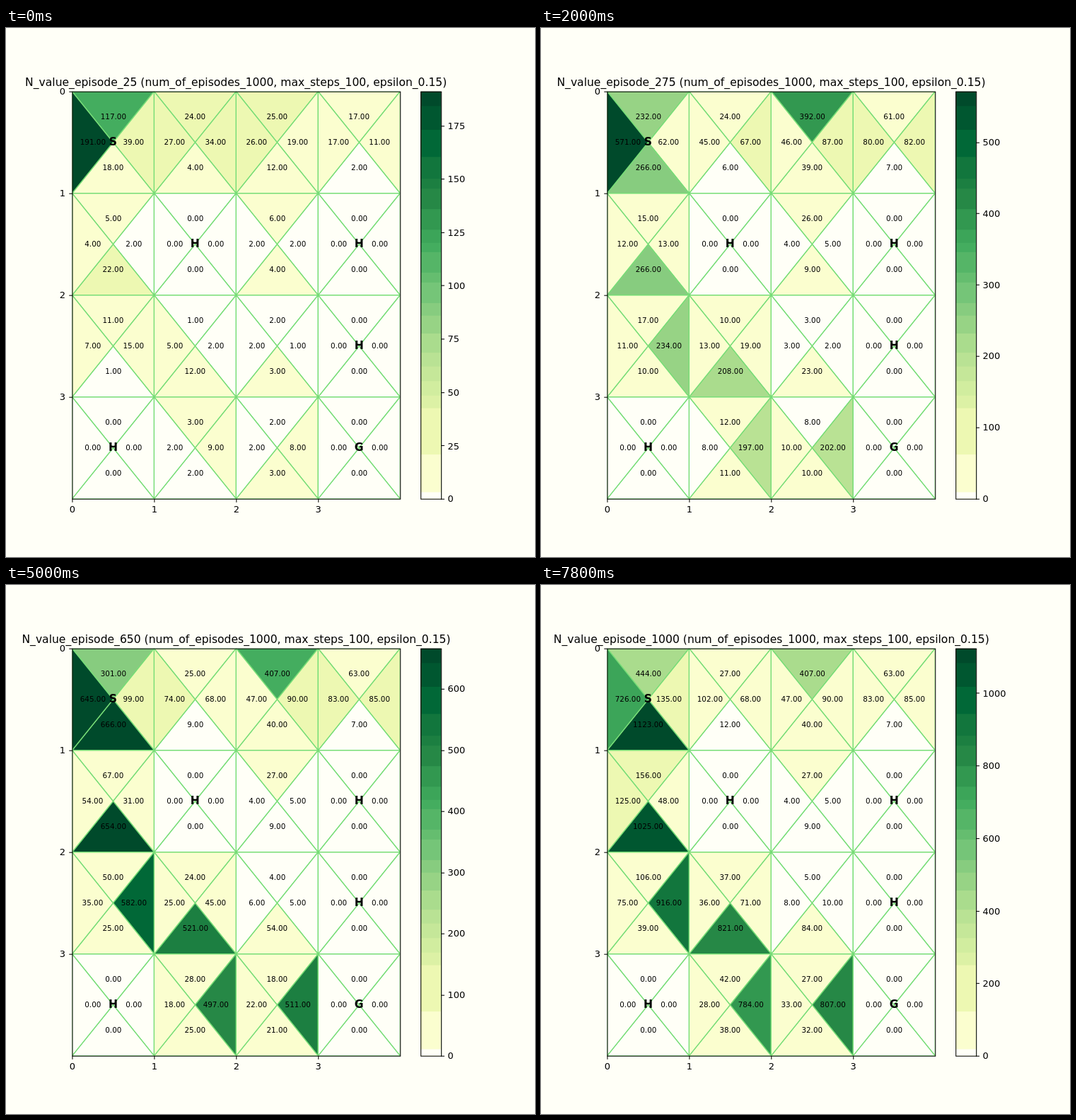
These frames come from a looping animation (748 by 748 pixels, 8 s). An HTML page with a canvas:

```html
<!DOCTYPE html>
<html lang="en">
<head>
<meta charset="utf-8">
<title>Visit counts per state and action</title>
<style>
  html, body { margin: 0; width: 100%; height: 100%; overflow: hidden; background: #fffff7; }
  canvas { display: block; }
</style>
</head>
<body>
<canvas id="stage" width="748" height="748"></canvas>
<script>
const ctx = document.getElementById('stage').getContext('2d');

// The figure is laid out on 800 units at 100 dpi, then scaled to the stage
const SIZE = 800, SCALE = 748 / SIZE, PT = 100 / 72;
const STEP_MS = 200, STEPS = 40, EPISODES_PER_STEP = 25;
const PAPER = '#fffff7', GRID = '#77dd77', INK = '#000';

const plot = { x: 100, y: 96, w: 496, h: 616 };
const bar = { x: 627, w: 30.8 };
const cellW = plot.w / 4, cellH = plot.h / 4;
const bottom = plot.y + plot.h;

// Yellow to green ramp, cut into flat bands that end at these of 256 levels
const RAMP = [0xffffe5, 0xf7fcb9, 0xd9f0a3, 0xaddd8e, 0x78c679, 0x41ab5d, 0x238443, 0x006837, 0x004529];
const ENDS = [4, 28, 57, 65, 74, 83, 92, 104, 115, 123, 136, 142, 155, 161, 169, 182, 195, 201, 215, 232, 247, 256];

function ramp(level) {
  const at = level / 256 * (RAMP.length - 1), i = Math.floor(at);
  const mix = shift => {
    const a = RAMP[i] >> shift & 255, b = RAMP[i + 1] >> shift & 255;
    return Math.round(a + (b - a) * (at - i));
  };
  return `rgb(${mix(16)}, ${mix(8)}, ${mix(0)})`;
}

const bands = ENDS.map((end, i) => ({ end, fill: i ? ramp((ENDS[i - 1] + end) / 2) : PAPER }));
const colour = share => bands.find(b => share * 256 < b.end || b.end === 256).fill;

// How a count grows from the first episode shown (p = 0) to the last (p = 1)
const grow = ease => (from, to) => p => from + (to - from) * ease(p);
const early = grow(p => 1 - (1 - p) ** 11);
const steady = grow(p => p ** 1.04);
const late = grow(p => p * p);

const KEY_TIMES = [25, 200, 350, 475, 650, 875, 1000].map(e => (e - 25) / 975);
const keyed = (...values) => p => {
  const i = Math.max(1, KEY_TIMES.findIndex(t => t >= p));
  const k = (p - KEY_TIMES[i - 1]) / (KEY_TIMES[i] - KEY_TIMES[i - 1]);
  return values[i - 1] + (values[i] - values[i - 1]) * k;
};

// Start, hole, goal or plain cell, row by row
const MAP = 'S....H.H...HH..G';
const never = Array(4).fill(() => 0);

// Open cells: growth of up, right, down, left
const cells = {
  0: [keyed(117, 229, 235, 291, 301, 403, 444), steady(39, 135),
      keyed(18, 185, 346, 478, 666, 926, 1123), keyed(191, 568, 573, 639, 645, 718, 726)],
  1: [late(24, 27), early(34, 68), steady(4, 12), steady(27, 102)],
  2: [early(25, 407), early(19, 90), early(12, 40), early(26, 47)],
  3: [early(17, 63), early(11, 85), early(2, 7), early(17, 83)],
  4: [late(5, 156), steady(2, 48), steady(22, 1025), late(4, 125)],
  6: [early(6, 27), early(2, 5), early(4, 9), early(2, 4)],
  8: [late(11, 106), steady(15, 916), steady(1, 39), late(7, 75)],
  9: [steady(1, 37), steady(2, 71), steady(12, 821), steady(5, 36)],
  10: [steady(2, 5), late(1, 10), steady(3, 84), steady(2, 8)],
  13: [steady(3, 42), steady(9, 784), steady(2, 38), steady(2, 28)],
  14: [steady(2, 27), steady(8, 807), steady(3, 32), steady(2, 33)]
};

function tickStep(max) {
  const raw = max / 9, power = 10 ** Math.floor(Math.log10(raw));
  return power * [1, 2, 2.5, 5, 10].find(s => s * power >= raw);
}

const snapPx = v => Math.floor(v + 0.5) + 0.5;

// align: 0 left, 0.5 centre, 1 right
function write(text, x, baseline, points, align, weight = 'normal') {
  ctx.font = `${weight} ${points * PT}px "DejaVu Sans", sans-serif`;
  ctx.fillStyle = INK;
  ctx.fillText(text, Math.round(x - ctx.measureText(text).width * align), Math.round(baseline));
}

function line(x1, y1, x2, y2) {
  ctx.beginPath();
  ctx.moveTo(x1, y1);
  ctx.lineTo(x2, y2);
  ctx.stroke();
}

function frame(x, y, w, h) {
  const left = snapPx(x), top = snapPx(y);
  ctx.strokeRect(left, top, snapPx(x + w) - left, snapPx(y + h) - top);
}

const corner = c => [plot.x + c % 4 * cellW, plot.y + Math.floor(c / 4) * cellH];

function drawCells(values, max) {
  ctx.save();
  ctx.beginPath();
  ctx.rect(plot.x, plot.y, plot.w, plot.h);
  ctx.clip();
  ctx.strokeStyle = GRID;
  ctx.lineWidth = PT;
  ctx.lineJoin = 'round';
  values.forEach((four, c) => {
    const [x, y] = corner(c);
    const corners = [[x, y], [x + cellW, y], [x + cellW, y + cellH], [x, y + cellH]];
    four.forEach((v, d) => {
      ctx.beginPath();
      ctx.moveTo(...corners[d]);
      ctx.lineTo(...corners[(d + 1) % 4]);
      ctx.lineTo(x + cellW / 2, y + cellH / 2);
      ctx.closePath();
      ctx.fillStyle = colour(v / max);
      ctx.fill();
      ctx.stroke();
    });
  });
  ctx.restore();
}

function drawCounts(values) {
  values.forEach((four, c) => {
    const [x, y] = corner(c), midX = x + cellW / 2, midY = y + cellH / 2;
    four.forEach((v, d) => {
      const turn = d * Math.PI / 2;
      write(v.toFixed(2), midX + Math.sin(turn) * cellW / 4,
        midY - Math.cos(turn) * cellH / 4 + 3.1, 8, 0.5);
    });
    if (MAP[c] !== '.') write(MAP[c], midX, midY + 4.6, 12, 0.5, 'bold');
  });
}

function drawAxes() {
  frame(plot.x, plot.y, plot.w, plot.h);
  for (let i = 0; i < 4; i++) {
    const x = plot.x + i * cellW, y = plot.y + i * cellH;
    line(snapPx(x), bottom, snapPx(x), bottom + 5.3);
    line(plot.x - 4.5, snapPx(y), plot.x + 0.5, snapPx(y));
    write(String(i), x, bottom + 20.5, 10, 0.5);
    write(String(i), plot.x - 9.72, y + 5.2, 10, 1);
  }
}

function drawBar(max) {
  for (const { end, fill } of [...bands].reverse()) {
    const height = Math.round(end / 256 * plot.h);
    ctx.fillStyle = fill;
    ctx.fillRect(bar.x, bottom - height, bar.w, height);
  }
  frame(bar.x, plot.y, bar.w, plot.h);
  const right = bar.x + bar.w, step = tickStep(max);
  for (let v = 0; v <= max; v += step) {
    const y = bottom - v / max * plot.h;
    line(right, snapPx(y), right + 5.3, snapPx(y));
    write(String(v), right + 9.72, y + 5.2, 10, 0);
  }
}

function draw(step) {
  const p = step / (STEPS - 1), episode = (step + 1) * EPISODES_PER_STEP;
  const values = [...MAP].map((_, c) => (cells[c] || never).map(count => Math.round(count(p))));
  const max = Math.max(...values.flat());

  ctx.setTransform(SCALE, 0, 0, SCALE, 0, 0);
  ctx.fillStyle = PAPER;
  ctx.fillRect(0, 0, SIZE, SIZE);
  drawCells(values, max);
  ctx.strokeStyle = INK;
  ctx.lineWidth = 0.8 * PT;
  drawAxes();
  drawBar(max);
  drawCounts(values);
  write(`N_value_episode_${episode} (num_of_episodes_1000, max_steps_100, epsilon_0.15)`,
    plot.x + plot.w / 2, plot.y - 8.33, 12, 0.5);
}

const start = performance.now();
let shown = -1;

function tick() {
  const step = Math.floor((performance.now() - start) / STEP_MS) % STEPS;
  if (step !== shown) draw(shown = step);
  requestAnimationFrame(tick);
}
tick();
</script>
</body>
</html>
```
